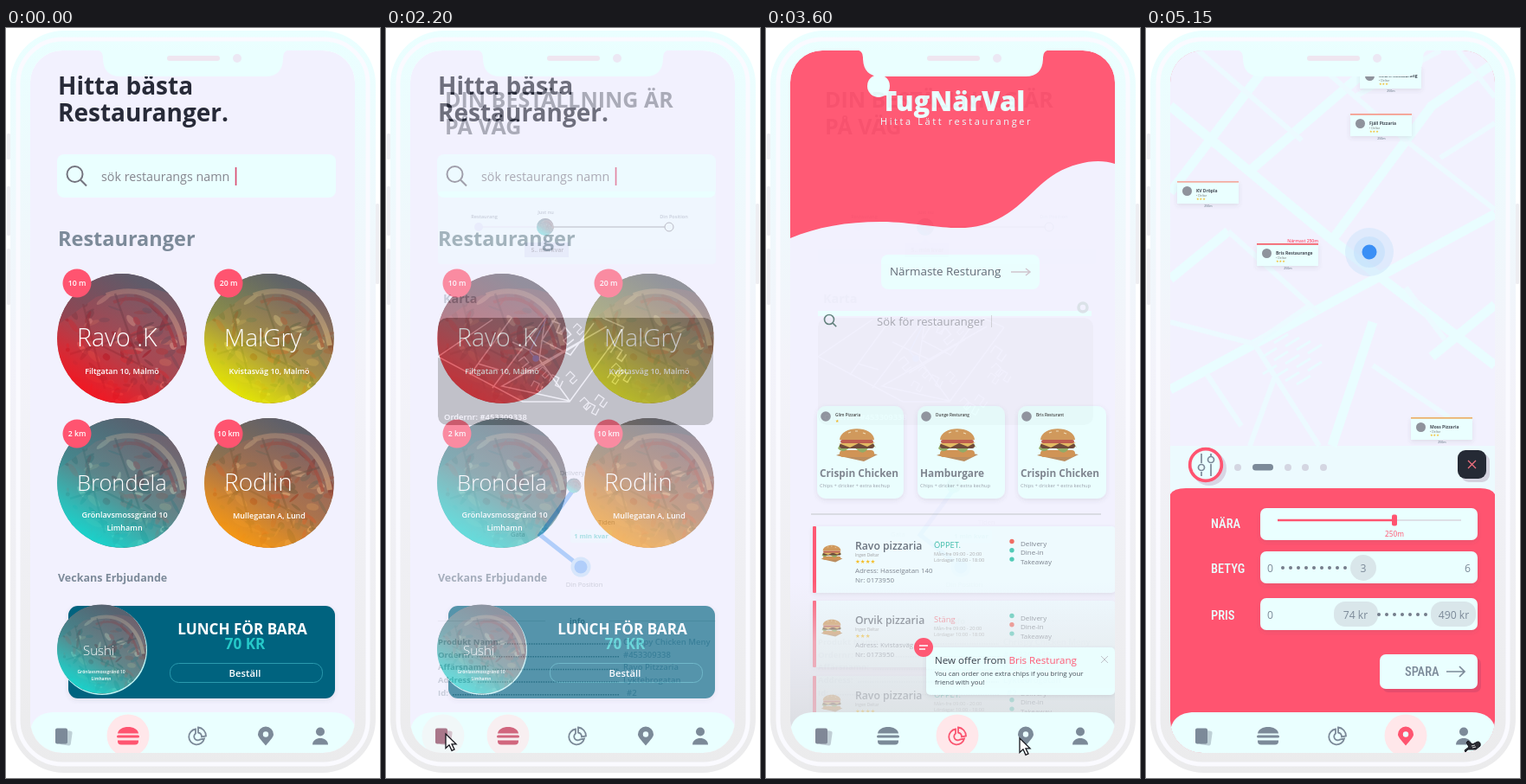
An HTML page for the animation above (5.35 s loop, 432 by 867 pixels).

```html
<!DOCTYPE html>
<html lang="sv">
<head>
<meta charset="utf-8">
<style>
html, body { margin: 0; width: 100%; height: 100%; overflow: hidden; background: #fff; }
svg { display: block; width: 432px; height: 867px; font-family: "Open Sans", "Noto Sans", sans-serif; }
.narrow { font-family: "Roboto Condensed", Roboto, sans-serif; font-stretch: 75%; }
</style>
</head>
<body>
<svg id="stage" viewBox="0 0 432 867"></svg>
<script>
const PINK = '#ff5470', PAPER = '#eaffff', SLATE = '#7c8a99', INK = '#272a38', SCREEN = '#f2f1fe', BLUE = '#3a8ff5';

const text = (x, y, size, str, fill = SLATE, weight = 400, anchor = 'start', extra = '') =>
  `<text x="${x}" y="${y}" font-size="${size}" fill="${fill}" font-weight="${weight}" text-anchor="${anchor}" ${extra}>${str}</text>`;
const mid = (x, y, size, str, fill, weight) => text(x, y, size, str, fill, weight, 'middle');
const rect = (x, y, w, h, r, fill, extra = '') =>
  `<rect x="${x}" y="${y}" width="${w}" height="${h}" rx="${r}" fill="${fill}" ${extra}/>`;
const circle = (x, y, r, fill, extra = '') => `<circle cx="${x}" cy="${y}" r="${r}" fill="${fill}" ${extra}/>`;
const path = (d, stroke, width, fill = 'none', extra = '') =>
  `<path d="${d}" fill="${fill}" stroke="${stroke}" stroke-width="${width}" ${extra}/>`;
const at = (x, y, content, scale = 1) => `<g transform="translate(${x} ${y}) scale(${scale})">${content}</g>`;
const times = (n, fn) => Array.from({ length: n }, (_, i) => fn(i)).join('');

function random(seed) {
  return () => (seed = (seed * 16807) % 2147483647) / 2147483647;
}

// Shared artwork
function pizzaArt() {
  const rnd = random(91);
  const tones = ['#7a2a38', '#cfa99a', '#554a55', '#a8434c', '#a87d72', '#5f5a68', '#8f4a50'];
  const blobs = times(120, i => {
    const a = rnd() * 6.3, d = 72 * Math.sqrt(rnd());
    const x = d * Math.cos(a), y = d * Math.sin(a) + 6;
    return `<ellipse rx="${2 + rnd() * 9}" ry="${1.2 + rnd() * 3}" fill="${tones[i % 7]}" opacity=".7"
      transform="translate(${x} ${y}) rotate(${rnd() * 180})"/>`;
  });
  return `<g clip-path="url(#disc)">${circle(0, 0, 75, '#84606a')}${blobs}
    ${path('M-75 -75H75V-38C48 -66 5 -60 -30 -48L-75 -15Z', 'none', 0, '#5f606d')}
    ${path('M-18 -50C28 -66 62 -38 70 8', '#c39a8a', 6, 'none', 'opacity=".85"')}
    ${path('M-10 -42C25 -56 52 -32 62 10', '#9c3f46', 4, 'none', 'opacity=".8"')}
    ${path('M-45 -40L-20 58M-8 -52L28 52M-60 18L58 -18M-50 -5L44 42', '#54434c', 2.5, 'none', 'opacity=".55"')}
    ${circle(0, 0, 75, 'url(#dusk)')}</g>`;
}

const burgerArt = `${path('M-24 13L-8 7L24 12L8 20Z', 'none', 0, '#b98a5a')}
  ${rect(-20, 7, 40, 8, 4, '#cf9150')}
  ${path('M-22 5Q-17 11 -11 6T1 7T12 6T22 4L20 1H-20Z', 'none', 0, '#8faa62')}
  ${rect(-20, -1, 40, 6, 3, '#6b4433')}
  ${path('M-21 -1L-8 4L2 -1L12 3L21 -2Z', 'none', 0, '#e3b85e')}
  ${rect(-19, -5, 38, 4, 2, '#bd5a4a')}
  ${path('M-20 -5C-19 -22 19 -22 20 -5Z', 'none', 0, '#cf9657')}
  ${path('M-10 -13l3 -1M-2 -15l3 0M7 -13l3 1', '#f0dcb5', 1.2)}`;

const tints = { red: '#f7141f', yellow: '#e8ec00', teal: '#14d8d0', orange: '#fa9a10' };
const pizza = (x, y, r, tint) =>
  at(x, y, `<use href="#pizza"/>${circle(0, 0, 75, `url(#${tint})`)}`, r / 75);

const defs = `<defs>
  <clipPath id="disc"><circle r="75"/></clipPath>
  <clipPath id="screen"><rect x="28" y="26" width="375" height="812" rx="37"/></clipPath>
  <clipPath id="cityBox"><rect x="60" y="335" width="318" height="124" rx="10"/></clipPath>
  <linearGradient id="dusk" x2="0" y2="1"><stop offset="0" stop-color="#565c6c" stop-opacity=".6"/>
    <stop offset=".6" stop-color="#565c6c" stop-opacity="0"/></linearGradient>
  <g id="pizza">${pizzaArt()}</g>
  <g id="burger">${burgerArt}</g>
  ${Object.entries(tints).map(([id, c]) => `<linearGradient id="${id}" x1=".2" y1=".95" x2=".7" y2=".1">
    <stop offset="0" stop-color="${c}"/><stop offset=".2" stop-color="${c}" stop-opacity=".75"/>
    <stop offset=".5" stop-color="${c}" stop-opacity=".32"/>
    <stop offset="1" stop-color="${c}" stop-opacity=".04"/></linearGradient>`).join('')}
  <linearGradient id="body" x2="0" y2="1"><stop offset="0" stop-color="#eaffff"/>
    <stop offset=".45" stop-color="#f3f3fa"/><stop offset="1" stop-color="#ebebec"/></linearGradient>
  <linearGradient id="haze" x2="0" y2="1"><stop offset="0" stop-color="#e6e8ec" stop-opacity="0"/>
    <stop offset=".35" stop-color="#e4e6ea" stop-opacity=".55"/>
    <stop offset="1" stop-color="#cfd2d6" stop-opacity=".85"/></linearGradient>
  <filter id="soft" x="-20%" y="-20%" width="140%" height="150%">
    <feDropShadow dx="0" dy="2" stdDeviation="2.5" flood-color="#556" flood-opacity=".13"/></filter>
</defs>`;

// Bottom navigation
const icons = [
  c => rect(-3, -7, 13, 17, 2, c, 'opacity=".4" transform="rotate(8)"') + rect(-9, -9, 14, 18, 2, c),
  c => path('M-12 -3C-11 -13 11 -13 12 -3Z', 'none', 0, c) + rect(-13, -1, 26, 3, 1.5, c) +
    path('M-12 5H12V6Q12 10 8 10H-8Q-12 10 -12 6Z', 'none', 0, c),
  c => path('M-2 -8A9 9 0 1 0 8 3L3 4A4 4 0 1 1 -2 -3Z', c, 1.8) +
    path('M1 -10A10 10 0 0 1 10 0L5 1A5 5 0 0 0 1 -4Z', c, 1.8),
  c => path('M0 11C-6 4 -9 1 -9 -2A9 9 0 0 1 9 -2C9 1 6 4 0 11Z', 'none', 0, c) + circle(0, -2, 3.2, PAPER),
  c => circle(0, -5, 5, c) + path('M-9 10C-9 0 9 0 9 10Z', 'none', 0, c)
];
function nav(active, personX = 363) {
  const xs = [66, 141, 221, 300, personX];
  const bar = path('M28 812C30 800 38 791 56 791H376C394 791 402 800 404 812C404 828 394 838 374 838H58C38 838 28 828 28 812Z', 'none', 0, PAPER);
  return bar + icons.map((icon, i) =>
    (i === active ? circle(xs[i], 818, 24.5, '#ffe7ea') : '') + at(xs[i], 818.5, icon(i === active ? PINK : SLATE))).join('');
}
const backdrop = rect(28, 26, 375, 812, 0, SCREEN);
const magnifier = (x, y, r, c, w) =>
  circle(x, y, r, 'none', `stroke="${c}" stroke-width="${w}"`) +
  path(`M${x + r * .7} ${y + r * .7}L${x + r * 1.5} ${y + r * 1.5}`, c, w);

// Pages
function homePage() {
  const place = (x, y, tint, name, size, away, lines) => pizza(x, y, 75, tint) +
    text(x - 52, y + 9, size, name, '#fff', 300) +
    lines.map((s, i) => mid(x + (lines.length > 1 ? 3 : 0), y + 38.5 + i * 15 + (lines.length > 1 ? 1 : 2), 9, s, '#fff', 600)).join('') +
    circle(x - 52 + (x > 200 ? 5 : 0), y - (y > 400 ? 57 : 64), 16.5, PINK) +
    mid(x - 52 + (x > 200 ? 5 : 0), y - (y > 400 ? 54 : 61), 8.8, away, '#fff', 600);
  return backdrop +
    text(60, 77, 28, 'Hitta bästa', INK, 700) + text(60, 108, 28, 'Restauranger.', INK, 700) +
    rect(59, 146, 322, 50, 8, PAPER) + magnifier(79.5, 169, 9, '#74747f', 2) +
    text(110, 177, 14.3, 'sök restaurangs namn', '#85858e') + rect(264.7, 161, 1.7, 21, 0, '#d94f72') +
    text(60, 252, 23.5, 'Restauranger', SLATE, 700) +
    place(134, 359, 'red', 'Ravo .K', 28.5, '10 m', ['Filtgatan 10, Malmö']) +
    place(304, 359, 'yellow', 'MalGry', 28, '20 m', ['Kvistasväg 10, Malmö']) +
    place(134, 526, 'teal', 'Brondela', 25.5, '2 km', ['Grönlavsmossgränd 10', 'Limhamn']) +
    place(304, 526, 'orange', 'Rodlin', 28, '10 km', ['Mullegatan A, Lund']) +
    text(60, 640, 12.5, 'Veckans Erbjudande', SLATE, 700) +
    rect(72, 668, 308, 107, 11, '#04647f', 'filter="url(#soft)"') +
    circle(111, 719, 52, '#bff3f3') + pizza(110.5, 718, 51.5, 'teal') +
    text(89, 725, 15, 'Sushi', '#fff', 300) +
    mid(110, 746, 5, 'Grönlavsmossgränd 10', '#fff', 600) + mid(110, 754, 5, 'Limhamn', '#fff', 600) +
    mid(273, 701, 17.1, 'LUNCH FÖR BARA', '#fff', 700) + mid(276, 718, 17.1, '70 KR', '#25c9c9', 700) +
    rect(189.5, 734.5, 176, 22, 10, 'none', 'stroke="#2a9aae"') + mid(276, 750, 11.3, 'Beställ', '#fff', 600) + nav(1);
}

function orderPage() {
  const roads = 'M60 380L158 432H212L275 346M97 401L145 335M123 416L184 335M60 380L123 337M212 431L134 414L255 345' +
    'M275 346L250 335M184 335L177 383L212 431M146 363L190 384M165 399L230 360M196 335L180 361L213 378L240 341M106 388L130 395';
  const rnd = random(37);
  const houses = [[197, 346], [208, 356], [222, 348], [182, 398], [196, 408], [174, 414], [214, 404], [160, 388],
    [230, 434], [238, 440], [248, 431], [267, 395], [275, 402], [262, 405], [268, 376]].map(([x, y]) =>
    path('M-7 4V-5H2V5H8V-4', '#e4e4e4', 1.5, 'none',
      `transform="translate(${x} ${y}) rotate(${22 + rnd() * 30}) scale(${.7 + rnd() * .4})"`)).join('');
  const rows = [['Produkt Namn:', 137, 'Chrispy Chicken Meny'], ['Ordernr:', 105, '#453309338'],
    ['Affärsnamn:', 123, 'Ravo Pitzzaria'], ['Address:', 106, 'Lyktebrogatan'], ['Id:', 77, '#2']];
  return backdrop +
    text(68, 92, 25, 'DIN BESTÄLLNING ÄR', INK, 700) + text(68, 123, 25, 'PÅ VÄG', INK, 700) +
    rect(60, 189, 321, 84, 4, PAPER) +
    path('M107 230H184', '#ded9ee', 1) + path('M184 230H322', '#55555c', 1.2) +
    circle(107, 230, 5, '#d9e2f8') + pizza(184, 230, 10, 'teal') +
    circle(327, 230, 5, PAPER, 'stroke="#55555c"') +
    mid(113.5, 220, 5.6, 'Restaurang', SLATE, 600) + mid(184.5, 215, 5.6, 'Just nu', SLATE, 600) +
    mid(332.5, 220, 5.6, 'Din Position', SLATE, 600) +
    path('M160 248H179L184 243L189 248H211V265H160Z', 'none', 0, '#d5e0f4') +
    mid(186.5, 259, 6.4, '5.. min kvar', '#727985', 700) +
    text(66, 318, 14.3, 'Karta', SLATE, 700) +
    `<g clip-path="url(#cityBox)">${rect(60, 335, 318, 124, 10, '#696969')}${path(roads, '#e9e9e9', 1.5)}${houses}
    ${path('M173 382L166 374L185 336', '#7fb5f0', 1.4)}${circle(173, 382, 3.8, BLUE)}</g>` +
    text(67, 453, 9.4, 'Ordernr: #453309338', '#fff', 600) +
    mid(215, 517, 7.6, 'Delivery', '#858b98') + text(144, 588, 7.6, 'Gata', '#858b98') + text(245, 574, 7.6, 'Tiden', '#858b98') +
    path('M217 533L178 586L225 623', BLUE, 5) + pizza(217, 529, 8.5, 'teal') +
    circle(225, 623, 11.5, '#a8d3f7') + circle(225, 623, 7.5, BLUE) +
    rect(213, 580, 48, 15, 2, PAPER) + mid(237, 590, 7.5, '1 min kvar', '#20bdb5', 700) +
    mid(229, 646, 7.6, 'Din Position', '#858b98') +
    path('M60 685.5H184M258 685.5H381', '#d4d4df', 1) + mid(221, 689, 9.2, 'info', SLATE, 700) +
    rows.map(([label, end, value], i) => {
      const y = 713 + i * 14.7;
      return text(60, y, 9.5, label, SLATE, 700) + path(`M${end} ${y - 1}H269`, SLATE, 1.5, 'none', 'stroke-dasharray="1.6 1.2"') +
        text(i === 4 ? 278 : 274, y, 9.5, value, '#a4b4ca', 600);
    }).join('') + nav(0);
}

function searchPage() {
  const card = (x, w, shop, dish, rating) => rect(x, 437, w, 107, 10, PAPER, 'filter="url(#soft)"') +
    circle(x + 10, 449, 5.8, '#9296a0') + text(x + 21, 449, 4.7, shop, '#444', 600) +
    (rating ? text(x + 21, 456, 5, '★', '#f3b824') : '') + at(x + 46, 481, '<use href="#burger"/>') +
    text(x + 3, 519, 11.8, dish, '#7b828c', 700) + text(x + 3, 531, 5.8, 'Chips + dricker + extra kechup', '#9aa0aa');
  const entry = (y, name, street, open) => rect(54, y, 350, 77, 5, '#eefbff', 'filter="url(#soft)"') + rect(54, y, 4, 77, 1, PINK) +
    at(76, y + 31, '<use href="#burger"/>', .52) + text(103, y + 27, 12.2, name, '#68707b', 600) +
    text(103, y + 34.5, 4.8, 'Ingen Deltar', '#999') + text(103, y + 43, 6.5, open ? '★★★★' : '★★★', '#f5bd22') +
    text(103, y + 54, 7.9, 'Adress: ' + street, '#7b828c') + text(103, y + 65, 7.9, 'Nr: 0173950', '#7b828c') +
    text(194, y + 25, 9.4, open ? 'ÖPPET.' : 'Stäng', open ? '#35b9a5' : '#f4808e') +
    text(194, y + 33.5, 5.6, 'Mån-fre 09:00 - 20:00', '#aaa') + text(194, y + 41, 5.6, 'Lördagar 10:00 - 18:00', '#aaa') +
    ['Delivery', 'Dine-in', 'Takeaway'].map((s, i) =>
      circle(284, y + 17.5 + i * 10.3, 2.7, i === (open ? 0 : 1) ? '#f0695f' : '#4cc9b4') +
      text(294, y + 23 + i * 10.3, 8, s, '#7b828c')).join('');
  return backdrop +
    path('M28 243C60 229 100 223 140 224C180 226 200 232 230 231C285 228 305 185 335 168C360 154 385 151 403 157V26H28Z', 'none', 0, PINK) +
    circle(130, 67, 13, PAPER) + text(133, 96, 31, 'TugNärVal', PAPER, 800) +
    text(132, 111.5, 11, 'Hitta Lätt restauranger', PAPER, 400, 'start', 'letter-spacing="2.6"') +
    rect(133, 262, 183, 40, 8, PAPER) + text(143, 286, 13.4, 'Närmaste Resturang', '#5f6672') +
    path('M283 282H305M300 278L305 282L300 286', '#cfc4cc', 1.5) +
    rect(60, 327, 316, 6, 0, PAPER) + circle(366, 323, 5, 'none', 'stroke="#dbe2e8" stroke-width="3.5"') +
    magnifier(73, 337, 5.5, '#64837f', 1.6) + text(128, 344, 13, 'Sök för restauranger', '#aaabb4') +
    rect(260, 332, 1, 14, 0, '#d3d3da') +
    card(59, 100, 'Glim Pizzaria', 'Crispin Chicken', true) + card(175, 101, 'Dunge Resturang', 'Hamburgare') +
    card(291, 102, 'Bris Resturant', 'Crispin Chicken') +
    path('M52 562H387', '#d2d4da', 1.6) +
    entry(576, 'Ravo pizzaria', 'Hasselgatan 140', true) + entry(662, 'Orvik pizzaria', 'Kvistasväg 10', false) +
    entry(749, 'Ravo pizzaria', 'Hasselgatan 140', true) + rect(28, 640, 375, 198, 0, 'url(#haze)') +
    rect(185, 716, 218, 55, 5, PAPER, 'filter="url(#soft)"') +
    circle(182, 716, 11, PINK) + path('M177 714H187M177 718H184', '#fff', 1.6) +
    text(195, 735, 11.6, `New offer from <tspan fill="${PINK}">Bris Resturang</tspan>`, '#333944') +
    text(195, 749, 7.9, 'You can order one extra chips if you bring your', '#444b55') +
    text(195, 759, 7.9, 'friend with you!', '#444b55') +
    path('M387 726L395 734M395 726L387 734', '#bfc3ca', 1) + nav(2);
}

function mapPage() {
  const wide = 'M28 418L403 215M28 190L150 30M28 90L215 245L403 390M120 165L265 40M215 245L330 90L403 40M28 290L95 235M262 340L215 483M330 380L403 320';
  const thin = 'M60 26L180 130M180 26L300 130M300 130L403 210M95 235L200 330M28 340L125 365L200 483M125 365L190 320M150 400L120 483M262 390L350 450M300 300L345 360M240 80L340 26M340 150L403 110M70 400L110 460M360 26L403 80';
  const pin = (x, y, name, line) => rect(x, y, 71, 25, 0, PAPER, 'filter="url(#soft)"') + rect(x, y - 1, 71, 1.7, 0, line) +
    circle(x + 11.5, y + 10.5, 5.5, '#8f939c') + text(x + 22, y + 12, 5, name, '#454b55', 700) +
    text(x + 22, y + 16.5, 3.5, '• Deltar', '#777') + text(x + 22, y + 21, 4, '★★★', '#f3bf30') + mid(x + 36, y + 29, 3.5, '250m', SLATE, 600);
  return backdrop + path(wide, '#e9fdff', 11) + path(thin, '#ecfaff', 6) +
    times(14, i => path(`M${135 + i % 5 * 13} ${360 + i * 4}l16 -10`, '#e9fbff', 3)) +
    pin(247, 45, 'Kvarn Restaurang', '#f5a48f') + pin(236, 100, 'Fjäll Pizzaria', '#f79a8b') +
    pin(36, 178, 'KV Dröpla', '#f5ab9f') + pin(128, 250, 'Bris Restaurange', '#f55d68') +
    text(199, 247.5, 5, 'Närmast 250m', PINK, 600, 'end') + pin(306, 451, 'Moss Pizzaria', '#edb069') +
    circle(258, 259, 28, '#cfe6fb', 'opacity=".55"') + circle(258, 259, 18, '#bfdffb', 'opacity=".55"') + circle(258, 259, 8.5, BLUE) +
    rect(28, 483, 375, 52, 0, PAPER, 'opacity=".65"') + nav(3, 367);
}

function filterPanel() {
  const label = (x, y, str, fill = PAPER) => text(x, y, 14.5, str, fill, 500, 'start', 'class="narrow"');
  const dots = (x, n) => times(n, i => circle(x + i * 9, 0, 2, '#747d8b'));
  const value = (x, y, str, anchor) => text(x, y, 12.2, str, SLATE, 400, anchor);
  return circle(73, 509, 20, '#d8d5e4') + circle(69, 505, 18.3, PAPER, `stroke="${PINK}" stroke-width="3.7"`) +
    path('M64 492V503M64 513V518M75 492V495M75 504V518', SLATE, 1.7) +
    circle(64, 508, 3.5, 'none', `stroke="${SLATE}" stroke-width="1.7"`) + circle(75, 499, 3.5, 'none', `stroke="${SLATE}" stroke-width="1.7"`) +
    [106, 164, 184, 205].map(x => circle(x, 508, 4, '#d4d6e2')).join('') + rect(123, 504, 24, 7.5, 3.7, SLATE) +
    rect(364, 492, 33, 33, 9, '#d4d3df') + rect(360, 488, 33, 33, 9, '#252a35') +
    path('M372 500L381 509M381 500L372 509', '#f1707f', 1.3) +
    path('M28 539Q32 532 46 532H386Q399 532 403 539V838H28Z', 'none', 0, PINK) +
    rect(132, 555, 251, 37, 7, PAPER, 'filter="url(#soft)"') + rect(132, 605, 251, 37, 7, PAPER, 'filter="url(#soft)"') +
    rect(132, 659, 251, 37, 7, PAPER, 'filter="url(#soft)"') +
    label(75, 578, 'NÄRA') + label(75, 630, 'BETYG') + label(75, 684, 'PRIS') +
    path('M152 569H287', PINK, 2.5) + path('M290 569H364', '#d8d5de', 1.6) + rect(284, 562.5, 6, 13, 2, PINK) +
    mid(287, 588, 8.3, '250m', PINK) +
    value(140, 629, '0') + at(158, 624, dots(0, 9)) + circle(251, 624, 15, '#d9e6ea') + value(251, 629, '3', 'middle') + value(375, 629, '6', 'end') +
    value(140, 683, '0') + rect(217, 663, 51, 29, 13, '#d9e6ea') + value(242, 683, '74 kr', 'middle') +
    at(269, 678, dots(0, 7)) + rect(329, 663, 52, 29, 13, '#d9e6ea') + value(355.5, 683, '490 kr', 'middle') +
    rect(273, 728, 114, 40, 7, '#d8486a', 'opacity=".6"') + rect(270, 724, 113, 40, 7, PAPER) +
    label(299, 749, 'SPARA', SLATE) + path('M347 744H368M362 738L368 744L362 750', SLATE, 1.7) + nav(3, 367);
}

const phoneFrame = path('M67 3H365A62 62 0 0 1 427 65V799A62 62 0 0 1 365 861H67A62 62 0 0 1 5 799V65A62 62 0 0 1 67 3Z' +
    'M65 26A37 37 0 0 0 28 63V801A37 37 0 0 0 65 838H366A37 37 0 0 0 403 801V63A37 37 0 0 0 366 26Z', 'none', 0, 'url(#body)', 'fill-rule="evenodd"') +
  rect(14, 13, 404, 838, 51, 'none', 'stroke="#fafaff" stroke-width="5"') +
  [[1, 122, 30], [1, 183, 57], [1, 255, 65], [427, 203, 93]].map(([x, y, h]) => rect(x, y, 4, h, 1.5, '#eeeef2')).join('') +
  path('M104 25Q112 26 112 34V36Q113 56 132 56H300Q319 56 320 36V34Q320 26 328 25Z', 'none', 0, PAPER) +
  rect(186, 32, 61, 6, 3, '#efe6f0') + circle(267, 35, 5, '#ece8f4');

const arrow = path('M0 0V16.5L4 12.8L7 19.3L10 18L7 11.8H12Z', '#15151c', 1.3, '#fff');
const hand = path('M-3 -4L2 0L8 -3Q12 -3 11 2L6 6H-3L-6 9L-7 7L-2 3L-5 -2Z', '#15151c', 1, '#2a2a31') + path('M1 2L5 1M2 4L6 3', '#fff', .8);

const stage = document.getElementById('stage');
stage.innerHTML = `${defs}<g clip-path="url(#screen)">
  <g>${homePage()}</g><g id="order">${orderPage()}</g><g id="search">${searchPage()}</g>
  <g id="map">${mapPage()}</g><g id="filter">${filterPanel()}</g></g>
  ${phoneFrame}<g id="arrow">${arrow}</g><g id="hand">${hand}</g>`;
const part = Object.fromEntries([...stage.querySelectorAll('g[id]')].map(g => [g.id, g]));

// Motion: time, x, y of the pointer
const LOOP = 5350, FADE = 450;
const track = [[550, 398, 400], [880, 301, 227], [980, 301, 227], [1700, 69, 816], [2300, 69, 816], [2600, 172, 811],
  [2850, 216, 815], [3350, 222, 816], [3600, 293, 821], [3850, 308, 821], [4700, 308, 821], [5050, 375, 828], [LOOP, 375, 828]];

const clamp = v => Math.min(1, Math.max(0, v));
const easeInOut = u => u < .5 ? 2 * u * u : 1 - 2 * (1 - u) ** 2;
const fade = (t, start) => 1 - (1 - clamp((t - start) / FADE)) ** 3;
const show = (g, opacity) => {
  g.setAttribute('opacity', opacity);
  g.setAttribute('visibility', opacity > 0 ? 'visible' : 'hidden');
};

function pointer(t) {
  const i = Math.max(1, track.findIndex(k => k[0] >= t));
  const [t0, x0, y0] = track[i - 1], [t1, x1, y1] = track[i];
  const u = easeInOut(clamp((t - t0) / (t1 - t0)));
  return [x0 + (x1 - x0) * u, y0 + (y1 - y0) * u];
}

function draw(time) {
  const t = Math.min(5150, Math.floor(time % LOOP / 50) * 50);
  show(part.order, fade(t, 2140));
  show(part.search, fade(t, 3300));
  const mapIn = fade(t, 4430);
  show(part.map, mapIn);
  show(part.filter, clamp(mapIn * 1.35));
  const [x, y] = pointer(t);
  const onPerson = t >= 5000;
  show(part.arrow, t >= 550 && !onPerson ? 1 : 0);
  show(part.hand, onPerson ? 1 : 0);
  part.arrow.setAttribute('transform', `translate(${x} ${y})`);
  part.hand.setAttribute('transform', `translate(${x} ${y})`);
}

const begin = performance.now();
function tick() {
  draw(performance.now() - begin);
  requestAnimationFrame(tick);
}
tick();
</script>
</body>
</html>
```
